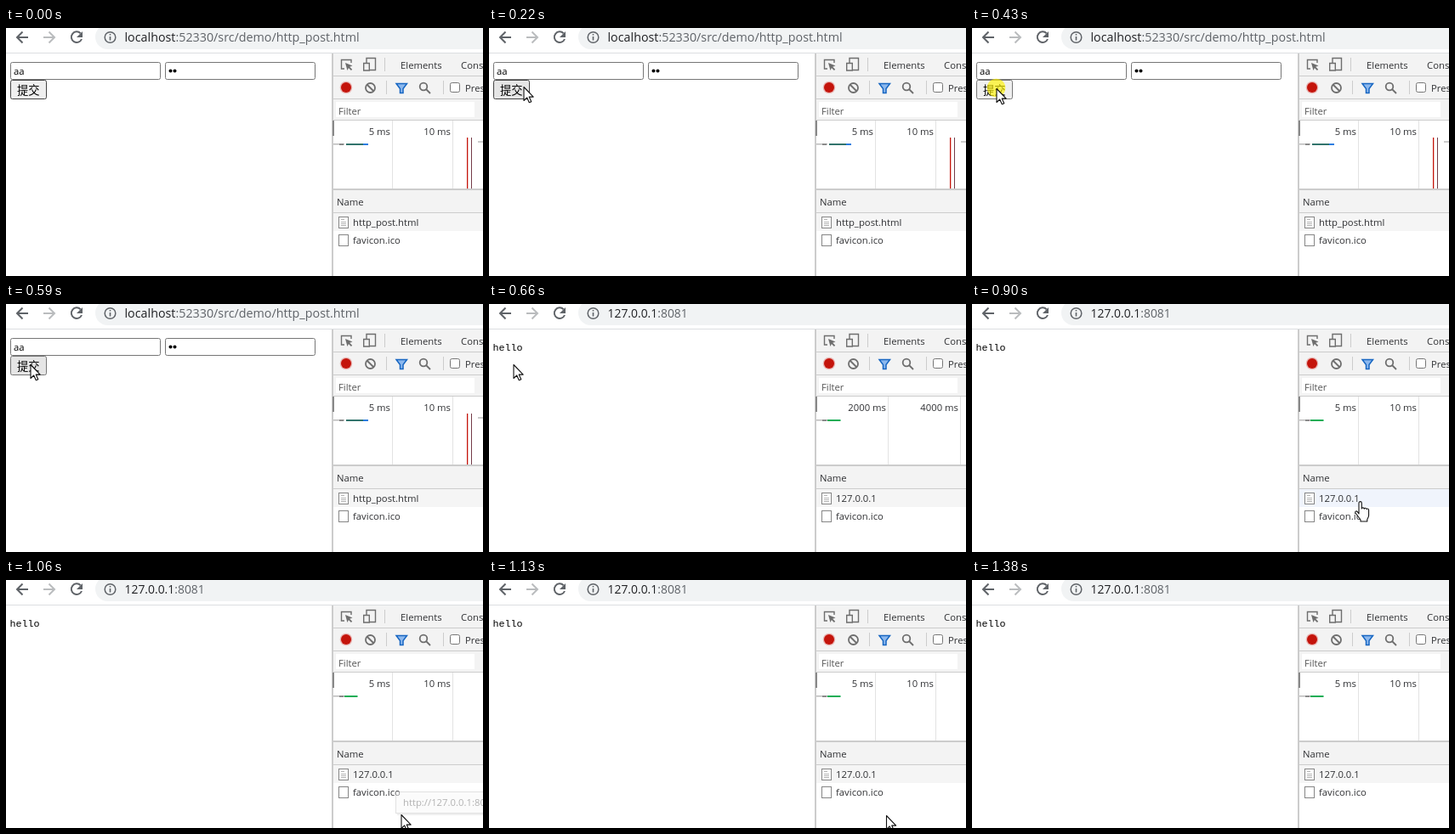
Animation, 561 px wide and 292 px high, one loop 2.08 s. Source, as an HTML page:

```html
<!DOCTYPE html>
<html lang="zh">
<head>
<meta charset="utf-8">
<style>
html, body { margin: 0; width: 100%; height: 100%; overflow: hidden; background: #fff; }
svg { display: block; }
text { font: 11.3px "Open Sans", sans-serif; fill: #303134; white-space: pre; }
.url { font-size: 14.3px; fill: #5f6368; }
.url tspan { fill: #202124; }
.stroke { fill: none; stroke: #5f6368; stroke-width: 2; }
.thin { fill: none; stroke: #6e6e6e; stroke-width: 1.4; }
.rule { fill: #ccc; }
.box { fill: #fff; stroke: #767676; }
.pointer { fill: #fff; stroke: #111; stroke-width: 1.1; stroke-linejoin: round; }
</style>
</head>
<body>
<svg width="561" height="292" viewBox="0 0 561 292">
  <rect width="561" height="292" fill="#fff"/>

  <!-- address bar -->
  <rect x="105" y="-4" width="480" height="29" rx="14.5" fill="#f1f3f4"/>
  <rect y="29" width="561" height="1" fill="#dcdee1"/>
  <path class="stroke" d="M26 11H13M19.5 4.5L13 11l6.5 6.5"/>
  <path class="stroke" style="stroke:#babcbe" d="M44 11h13M50.500 4.500L57 11l-6.500 6.500"/>
  <path class="stroke" d="M87.700 6.300A6.300 6.300 0 1 0 89 13"/>
  <path d="M90 4v7h-7z" fill="#5f6368"/>
  <circle class="stroke" style="stroke-width:1.5" cx="122.500" cy="11" r="6.300"/>
  <path class="stroke" style="stroke-width:1.600" d="M122.500 10v4.500M122.500 7v1.600"/>

  <!-- form page -->
  <g id="form">
    <text class="url" x="139.500" y="16"><tspan>localhost</tspan>:52330/src/demo/http_post.html</text>
    <rect class="box" x="5.500" y="40.500" width="176" height="20" rx="2"/>
    <rect class="box" x="187.500" y="40.500" width="176" height="20" rx="2"/>
    <text x="9" y="55" style="fill:#000">aa</text>
    <circle cx="193.500" cy="50.500" r="2"/><circle cx="198.500" cy="50.500" r="2"/>
    <rect id="button" x="5.500" y="61.500" width="42" height="22" rx="2"/>
    <text x="13" y="77.500" style="font:13.300px 'Noto Sans CJK SC','Noto Sans CJK',sans-serif;fill:#000">提交</text>
  </g>

  <!-- reply page -->
  <g id="reply">
    <text class="url" x="139.500" y="16" style="font-size:13.900px"><tspan>127.0.0.1</tspan>:8081</text>
    <text x="4.500" y="55" style="font:11.700px 'Liberation Mono',monospace;fill:#000">hello</text>
  </g>

  <!-- developer tools -->
  <rect x="384" y="30" width="177" height="79" fill="#f3f3f3"/>
  <rect x="384" y="190" width="177" height="28" fill="#f3f3f3"/>
  <rect id="row" x="385" y="218" width="176" height="21"/>
  <rect class="rule" x="383" y="30" width="2" height="262"/>
  <g class="rule">
    <rect x="385" y="56" width="176" height="1"/><rect x="385" y="83" width="176" height="1"/>
    <rect x="385" y="108" width="176" height="1"/><rect x="385" y="189" width="176" height="2"/>
    <rect x="385" y="217" width="176" height="1"/>
    <rect x="445" y="35" width="1" height="16"/><rect x="447" y="62" width="1" height="16"/>
    <rect x="514" y="62" width="1" height="16"/>
  </g>
  <path class="thin" d="M398 48h-3.500v-10.500h11.500V41"/>
  <path d="M399 41l8.500 3.500-3.300 1.200 3 3-1.300 1.300-3-3-1.400 3z" fill="#6e6e6e"/>
  <path class="thin" d="M424 41v-5.500h10.500v14H428M420.700 41.500h6.600v8.500h-6.600z"/>
  <text x="464" y="48">Elements</text>
  <text x="535" y="48">Console</text>
  <circle cx="400" cy="70" r="7.300" fill="#e9b5b3"/><circle cx="400" cy="70" r="6" fill="#c4140b"/>
  <g class="thin" style="stroke-width:1.800">
    <circle cx="428.500" cy="70.500" r="5.500"/><path d="M424.500 66.500l8 8"/>
    <circle cx="491" cy="69" r="4.300"/><path d="M494 72l5 5"/>
  </g>
  <path d="M459 65.500h12.500l-4.500 6v5h-3.500v-5z" fill="#8cb8ee" stroke="#1766c2" stroke-width="1.500"/>
  <rect class="box" x="522.500" y="64.500" width="11" height="11" rx="2"/>
  <text x="540" y="74.500">Preserve log</text>
  <rect x="388" y="87" width="163" height="18" fill="#fff"/>
  <text x="391" y="102" style="fill:#555">Filter</text>
  <text x="389" y="209">Name</text>

  <!-- timeline -->
  <g fill="#e3e3e3"><rect id="grid1" y="109" width="1" height="80"/><rect id="grid2" y="109" width="1" height="80"/></g>
  <text id="tick1" y="126" text-anchor="end"></text>
  <text id="tick2" y="126" text-anchor="end"></text>
  <rect x="384" y="109" width="2" height="18" fill="#888"/>
  <rect x="385" y="136" width="13" height="1.500" fill="#bbb"/>
  <rect x="392" y="136" width="5" height="2" fill="#8a8a8a"/>
  <g id="formTiming">
    <rect x="400" y="136" width="21" height="2" fill="#32746c"/><rect x="420" y="136" width="6" height="2" fill="#2b7de0"/>
    <rect x="542" y="129" width="1.300" height="60" fill="#c4140b"/><rect x="547" y="129" width="1" height="60" fill="#743b48"/>
    <rect x="555" y="133" width="6" height="2" fill="#ccc"/>
  </g>
  <rect id="replyTiming" x="398" y="136" width="15.500" height="2" fill="#16ad55"/>

  <!-- requests -->
  <g fill="#fff" stroke="#858585">
    <rect x="391.500" y="222.500" width="11" height="13"/><rect x="391.500" y="243.500" width="11" height="13"/>
    <path d="M394 225.500h4M394 228.500h6M394 230.500h6M394 232.500h6" stroke="#b5b5b5"/>
  </g>
  <text id="request" x="408" y="233"></text>
  <text x="408" y="254">favicon.ico</text>

  <g id="tooltip">
    <rect x="2" y="2" width="132" height="26" fill="#000" opacity=".13"/>
    <rect x=".5" y=".5" width="131" height="25" fill="#f8f8f8" stroke="#c5c5c5"/>
    <text x="9" y="17" style="fill:#686868">http://127.0.0.1:8081/</text>
  </g>

  <circle id="click" cx="28.500" cy="70.500" r="10.800" fill="#fff200" opacity=".65"/>
  <path id="arrow" class="pointer" d="M.5 .5v16l3.700-3.500 2.600 5.800 2.500-1.100-2.600-5.600h5z"/>
  <path id="hand" class="pointer" d="M5 15V2.500c0-2.500 3.300-2.500 3.300 0V9c0-1.500 3-1.500 3 .3 0-1.500 2.800-1.300 2.800.5 0-1.300 2.500-1 2.500.8V17c0 2-1.300 3.500-1.800 4.500V24H7v-2L1 14c-1-1.800 1-2.800 2.300-1.300z"/>
</svg>
<script>
const LOOP = 2080;
const $ = id => document.getElementById(id);

// Each step changes only the properties it names.
const steps = [
  { at: 0, page: "form", button: "#efefef", border: "#444", unit: "ms", ticks: [5, 10], row: "#f5f5f5" },
  { at: 220, arrow: [40.5, 69], button: "#e5e5e5" },
  { at: 280, arrow: [30, 71] },
  { at: 360, arrow: [28.5, 71], click: true, button: "#f5f5f5", border: "#8d8d8d" },
  { at: 430, button: "#efefef", border: "#767676" },
  { at: 590, click: false, button: "#e5e5e5" },
  { at: 660, page: "reply", ticks: [2000, 4000] },
  { at: 750, arrow: [417, 224], ticks: [5, 10], row: "#f0f4fc" },
  { at: 830, arrow: null, hand: [439.5, 236.5], tooltip: [417, 231, .88] },
  { at: 900, hand: [450, 232], tooltip: null },
  { at: 980, hand: [453, 230], tooltip: [458, 249, .95] },
  { at: 1060, hand: null, arrow: [464.5, 276], tooltip: [458, 249, .5], row: "#f5f5f5" },
  { at: 1130, arrow: [467, 277], tooltip: null },
  { at: 1300, arrow: [479, 281] },
  { at: 1380, arrow: null }
];

function show(id, visible) {
  $(id).style.display = visible ? "" : "none";
}

function place(id, position) {
  show(id, position);
  if (!position) return;
  const [x, y, opacity = 1] = position;
  $(id).setAttribute("transform", `translate(${x} ${y})`);
  $(id).setAttribute("opacity", opacity);
}

function draw(time) {
  const s = Object.assign({}, ...steps.filter(step => step.at <= time));
  const isForm = s.page === "form";
  show("form", isForm);
  show("formTiming", isForm);
  show("reply", !isForm);
  show("replyTiming", !isForm);
  show("click", s.click);
  ["arrow", "hand", "tooltip"].forEach(id => place(id, s[id]));
  $("button").setAttribute("fill", s.button);
  $("button").setAttribute("stroke", s.border);
  $("row").setAttribute("fill", s.row);
  $("request").textContent = isForm ? "http_post.html" : "127.0.0.1";

  const lines = s.ticks[0] === 5 ? [454, 525] : [469, 554];
  lines.forEach((x, i) => {
    $("grid" + (i + 1)).setAttribute("x", x);
    const tick = $("tick" + (i + 1));
    tick.setAttribute("x", x - 2);
    tick.textContent = `${s.ticks[i]} ${s.unit}`;
  });
}

const start = performance.now();
function frame() {
  draw((performance.now() - start) % LOOP);
  requestAnimationFrame(frame);
}
frame();
</script>
</body>
</html>
```
